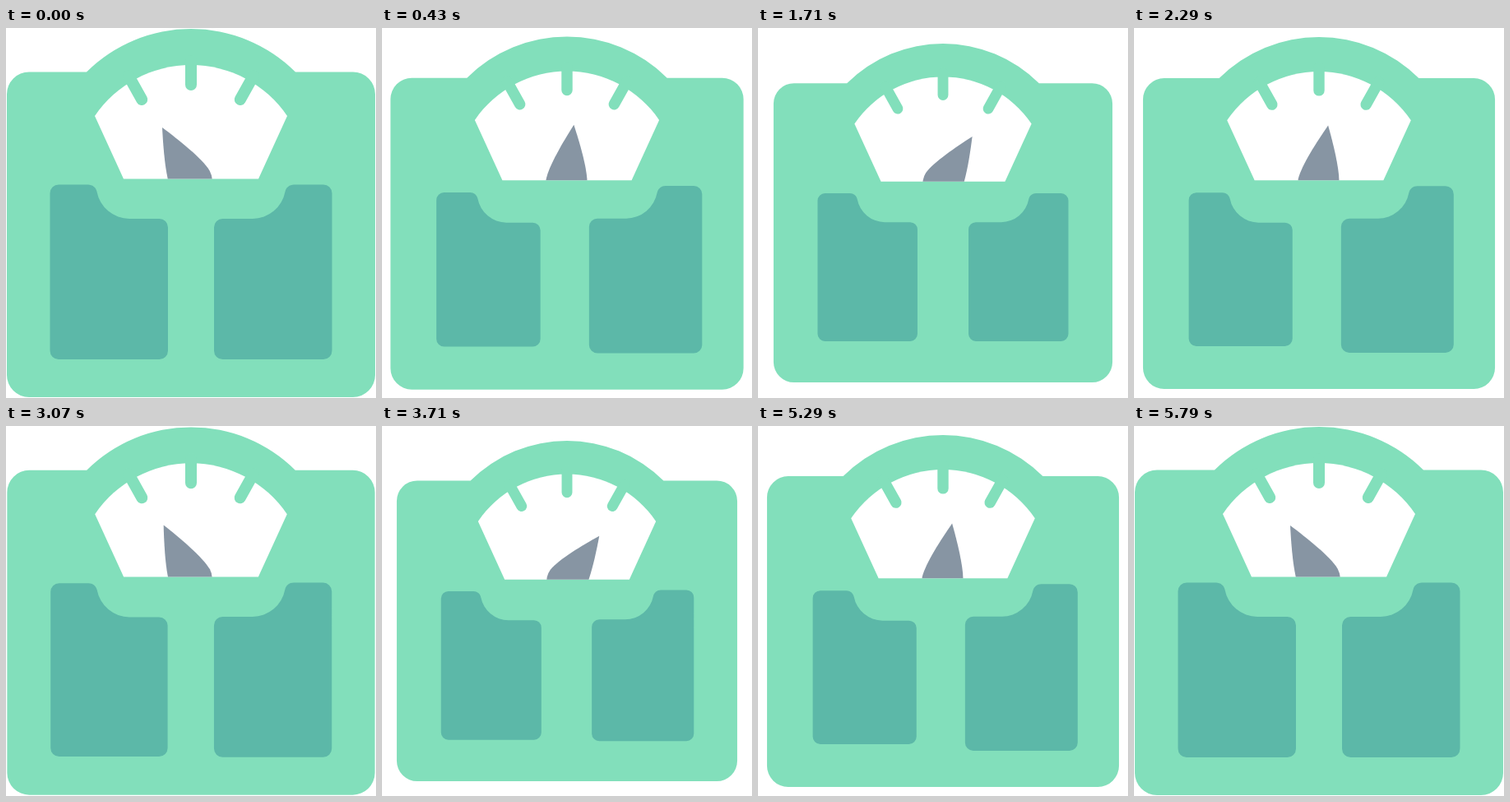
These frames come from a looping animation (450 px wide and 450 px high, 6000 ms). An HTML page:

```html
<!DOCTYPE html>
<html lang="en">
<head>
<meta charset="utf-8">
<title>Bathroom scale</title>
<style>
  html, body { margin: 0; width: 100%; height: 100%; overflow: hidden; background: #fff; }
  svg { display: block; width: 100%; height: 100%; }
  .body { fill: #82dfbb; }
  .dial { fill: #fff; }
  .needle { fill: #8795a3; }
  .pad { fill: #5cb8a8; }
  .ticks { fill: none; stroke: #82dfbb; stroke-width: 14; stroke-linecap: round; }
</style>
</head>
<body>
<svg viewBox="0 0 450 450">
  <defs>
    <path id="dial" d="M108 107A141.4 141.4 0 0 1 342 107L307 183.5H143Z"/>
    <clipPath id="window"><use href="#dial"/></clipPath>
    <path id="pad" d="M64 190.5H100C105 190.5 109.5 194 110.5 199A40.5 40.5 0 0 0 150 232H186.5A10.5 10.5 0 0 1 197 242.5V392.5A10.5 10.5 0 0 1 186.5 403H64A10.5 10.5 0 0 1 53.5 392.5V201A10.5 10.5 0 0 1 64 190.5Z"/>
  </defs>
  <g id="scale">
    <path class="body" d="M28 53.5H98A180 180 0 0 1 352 53.5H422A27 27 0 0 1 449 80.5V422A27 27 0 0 1 422 449H28A27 27 0 0 1 1 422V80.5A27 27 0 0 1 28 53.5Z"/>
    <use class="dial" href="#dial"/>
    <path class="ticks" d="M225 40V69M149 58L165.2 87M301 58L284.8 87"/>
    <g clip-path="url(#window)">
      <path id="needle" class="needle" d="M0 -73.5C11 -50 25 -18 26.3 0A26.3 26.3 0 0 1 -26.3 0C-25 -18 -11 -50 0 -73.5Z"/>
    </g>
    <g id="left"><use class="pad" href="#pad"/></g>
    <g id="right"><use class="pad" href="#pad" transform="matrix(-1 0 0 1 450 0)"/></g>
  </g>
</svg>
<script>
  const FPS = 14, PERIOD = 3000;
  const [scale, needle, left, right] =
    ["scale", "needle", "left", "right"].map(id => document.getElementById(id));

  const ease = (t, from, to) => {
    const s = Math.min(1, Math.max(0, (t - from) / (to - from)));
    return s * s * (3 - 2 * s);
  };

  // Rises from 0 to 1 over a..b, falls back over c..d.
  const press = (t, a, b, c, d) => ease(t, a, b) - ease(t, c, d);

  const shrink = (el, x, y, amount) => {
    const k = 1 - 0.08 * amount;
    el.setAttribute("transform", `translate(${x} ${y}) scale(${k}) translate(${-x} ${-y})`);
  };

  function draw(t) {
    const load = press(t, 0, 833, 1900, 2733);
    const dip = press(t, 833, 1367, 1367, 1900);
    shrink(scale, 225, 225, load);
    shrink(left, 125.25, 296.75, press(t, 0, 417, 2317, 2733));
    shrink(right, 324.75, 296.75, press(t, 417, 833, 1900, 2317));
    const angle = -28 + 67.5 * load - 26 * dip;
    needle.setAttribute("transform", `translate(224.5 186) rotate(${angle})`);
  }

  const start = performance.now();
  function tick() {
    // The motion is stepped; 5 ms keeps steps aligned to whole centiseconds.
    const step = Math.floor((performance.now() - start + 5) * FPS / 1000);
    draw(step * 1000 / FPS % PERIOD);
    requestAnimationFrame(tick);
  }
  tick();
</script>
</body>
</html>
```
